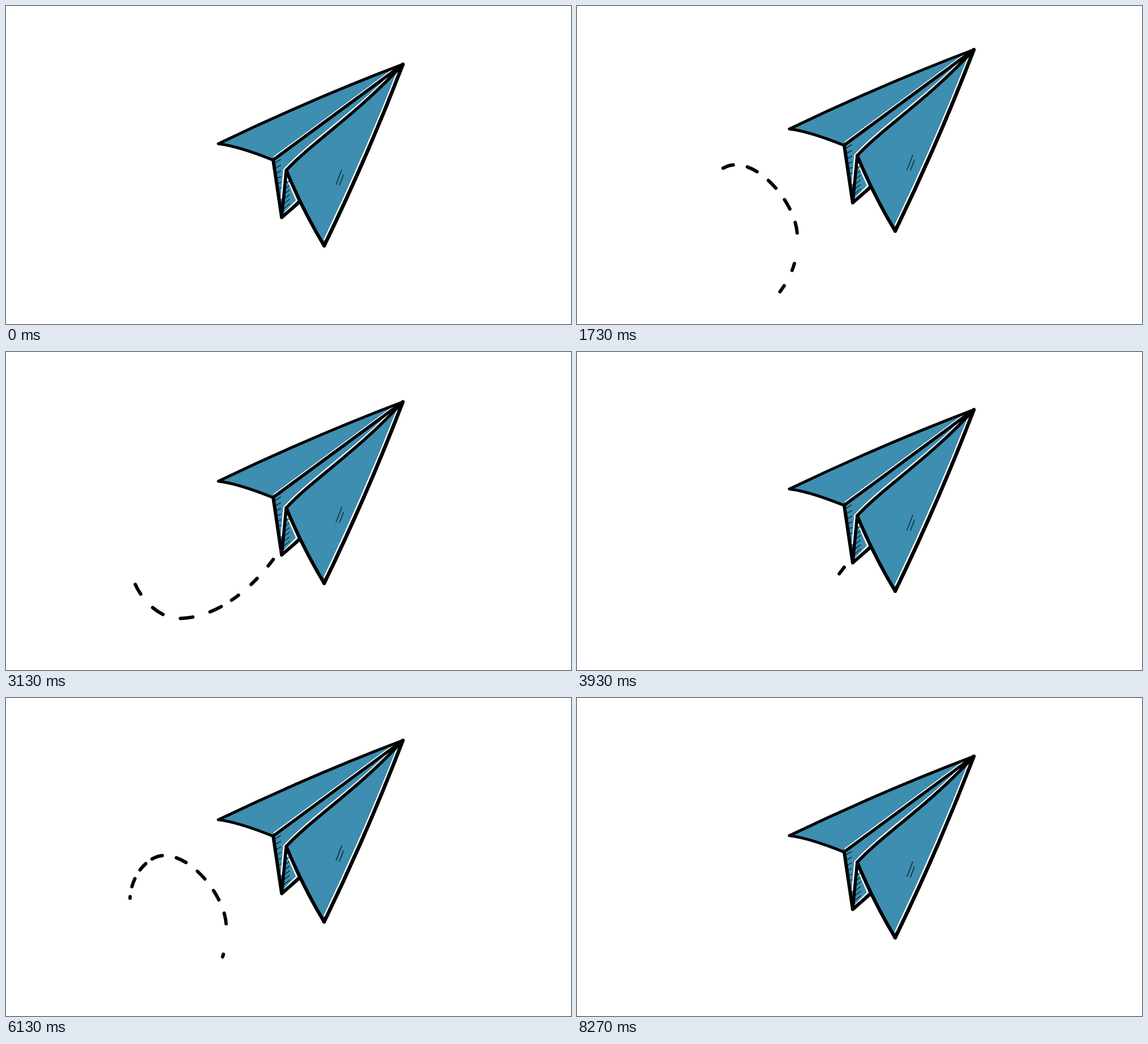
Recreate the animation shown at these times as an HTML page. Size 998x561 px, loop 8.31 s.

```html
<!DOCTYPE html>
<html lang="en">
<head>
<meta charset="utf-8">
<title>Paper plane</title>
<style>
html, body { margin: 0; width: 100%; height: 100%; overflow: hidden; background: #fff; }
svg { display: block; width: 998px; height: 561px; }
path { fill: none; stroke: #000; stroke-linecap: round; stroke-linejoin: round; }
.paper { fill: #3d8eb0; stroke: none; }
.light { stroke: #fff; stroke-width: 2.6; }
.thin { stroke: #0c2a36; stroke-width: 1.5; }
</style>
</head>
<body>
<svg viewBox="0 0 998 561">
  <g id="scene">
    <path id="trail" stroke-width="6" pathLength="829"
      d="M295 588C352 549 394 500 389 430C388 380 330 306 280 306C248 306 219 345 219 385C219 432 262 485 305 485C370 485 432 435 472 381"/>
    <g transform="translate(0 1)">
      <path class="paper" d="M375 242Q540 163 701 102Q638 266 562 422Q524 359 518 345L487 372L472 271Q410 246 375 242Z"/>
      <path class="light" d="M474 265L690 106.500M486.500 338L491 288C537 237 617 187 690 109M691 117Q633 264 562.500 411M497 304L513.500 342L490 366"/>
      <path class="thin" id="hatch"/>
      <path class="thin" d="M593 288L583 314M596 297L589 315"/>
      <path stroke-width="5" d="M701 102Q540 163 375 242Q410 246 472 271"/>
      <path stroke-width="5.500" d="M472 270.500L701 102C620 190 540 240 495 289L487 372"/>
      <path stroke-width="6" d="M472 271L487 372L518 345M495 289Q524 359 562 422"/>
      <path stroke-width="6.500" d="M562 422Q638 266 701 102"/>
    </g>
  </g>
</svg>
<script>
const LOOP = 4155;
const $ = id => document.getElementById(id);

// Pencil shading on both sides of the keel, each row lower and slightly shifted.
let shading = "";
for (let i = 0; i < 6; i++) {
  shading += `M${475 + i * 1.2} ${276 + i * 9}l${10 - i} ${i - 6}`;
  shading += `M${494 - i * 0.8} ${312 + i * 9}l${6 + i} ${-4 - i}`;
}
$("hatch").setAttribute("d", shading);

// Runs of evenly spaced dashes: centre of the first, count, step, length.
const marks = [[6, 4, 43.5, 13], [207, 5, 44.5, 19], [416, 3, 33, 15], [531, 4, 54, 22], [733, 3, 44.5, 15]]
  .flatMap(([first, count, step, length]) => Array.from({ length: count }, (_, i) => {
    const mid = first + i * step;
    return [mid - length / 2, mid + length / 2];
  }));

function drawTrail(head, tail) {
  const shown = marks
    .map(([a, b]) => [Math.max(a, tail), Math.min(b, head)])
    .filter(([a, b]) => a < b);
  const trail = $("trail").style;
  trail.visibility = shown.length ? "visible" : "hidden";
  if (!shown.length) return;
  // The dash pattern starts at the first visible dash and ends in a long gap.
  trail.strokeDasharray = shown.map(([a, b], i) => {
    const next = shown[i + 1];
    return `${b - a} ${next ? next[0] - b : 2000}`;
  }).join(" ");
  trail.strokeDashoffset = -shown[0][0];
}

const start = performance.now();

function draw(now) {
  const t = Math.max(0, now - start) % LOOP;
  const rise = 14.25 * (1 - Math.cos((t - 50) / LOOP * 2 * Math.PI));
  $("scene").setAttribute("transform", `translate(0 ${-rise})`);
  drawTrail(0.322 * (t - 494), 0.3325 * (t - 1560));
  requestAnimationFrame(draw);
}
draw(start);
</script>
</body>
</html>
```
